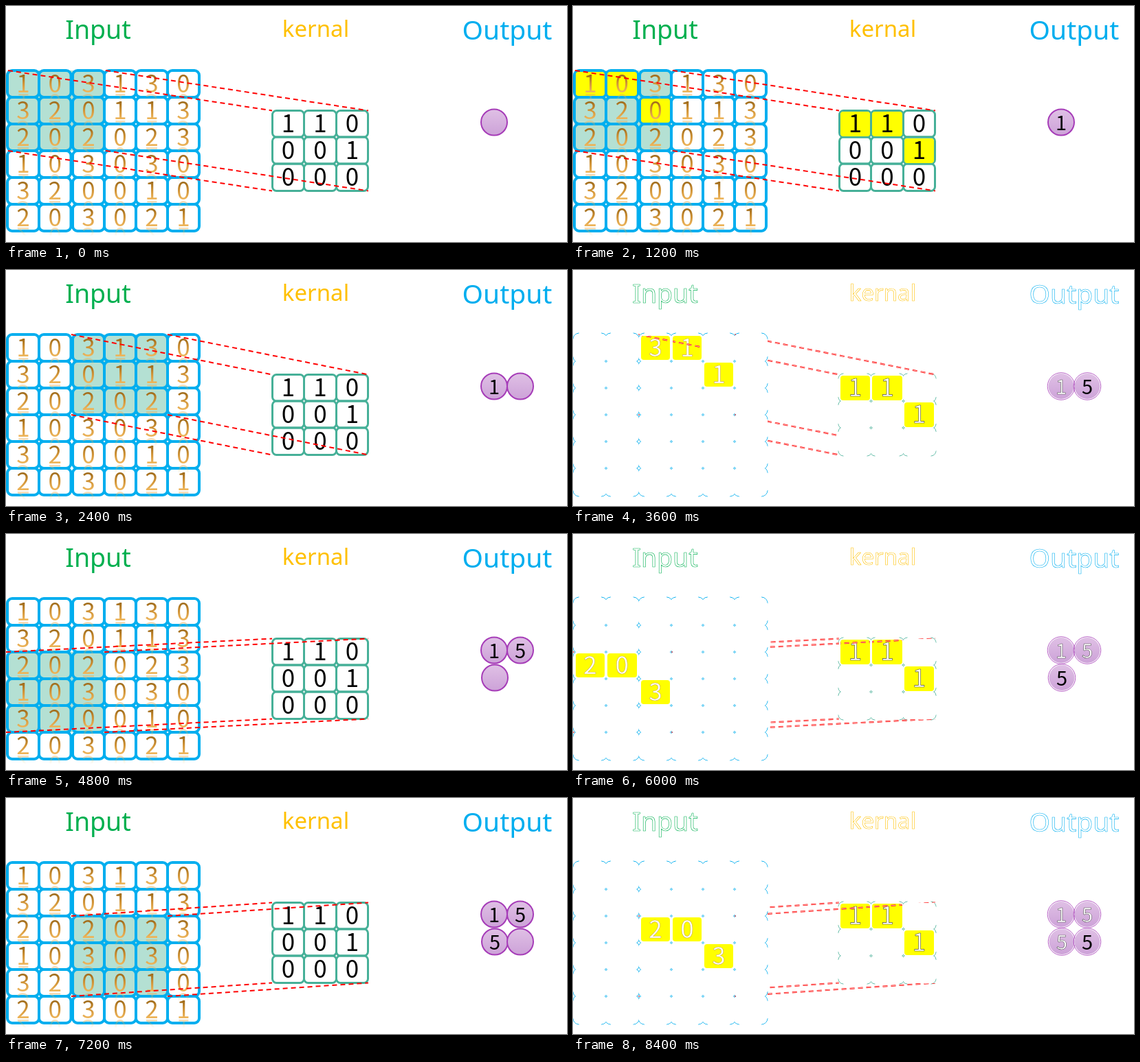
Recreate the animation shown at these times as an HTML page with a canvas. Size 816x344 px, loop 9.6 s.

```html
<!DOCTYPE html>
<html lang="en">
<head>
<meta charset="utf-8">
<title>Convolution with stride 2</title>
<style>
html, body { margin: 0; width: 100%; height: 100%; overflow: hidden; background: #fff; }
canvas { display: block; }
</style>
</head>
<body>
<canvas id="stage" width="816" height="344"></canvas>
<script>
const ctx = document.getElementById('stage').getContext('2d');
const STEP = 1200, STEPS = 8;
const BLUE = '#00aeef', TEAL = '#46b098', RED = '#ff0000', YELLOW = '#ffff00';
const DIGITS = '"Noto Sans CJK TC", "Noto Sans CJK SC", "Noto Sans CJK JP", "Noto Sans CJK", Lato, sans-serif';

const input = {
  values: ['103130', '320113', '202023', '103030', '320010', '203021'],
  cols: [[2, 48], [48, 94.5], [97, 143], [143, 189], [189, 235], [235, 281]],
  rows: [94, 133, 172, 211, 250, 289, 328],
  color: BLUE, width: 4, radius: 7
};
const kernel = {
  values: ['110', '001', '000'],
  cols: [[387.5, 433.5], [433.5, 480.5], [480.5, 526.5]],
  rows: [152.5, 191, 230, 269.5],
  color: TEAL, width: 3, radius: 6
};
const windows = [[0, 0], [0, 2], [2, 0], [2, 2]];
const hits = [[0, 0], [0, 1], [1, 2]];
const sums = ['1', '5', '5', '5'];
const spots = [[710, 169.5], [748, 169.5], [711, 209.5], [748, 209.5]];
const titles = [
  ['Input', 134, 48, 37.5, '#00b050'],
  ['kernal', 450.5, 45, 33, '#ffc000'],
  ['Output', 729, 48.5, 39, '#00aeef']
];

function roundBox(x, y, w, h, r) {
  ctx.beginPath();
  ctx.roundRect(x, y, w, h, r);
}

function eachCell(grid, draw) {
  grid.values.forEach((line, r) => [...line].forEach((digit, c) => {
    const [x, right] = grid.cols[c], y = grid.rows[r];
    draw(x, y, right - x, grid.rows[r + 1] - y, digit, r, c);
  }));
}

function drawText(text, x, y, color, outline) {
  ctx.fillStyle = color;
  ctx.fillText(text, x, y);
  if (!outline) return;
  ctx.strokeStyle = outline;
  ctx.lineWidth = 0.6;
  ctx.lineJoin = 'round';
  ctx.strokeText(text, x, y);
}

function drawTitles(ghost) {
  for (const [text, x, y, size, color] of titles) {
    ctx.font = `${size}px "Noto Sans", "Open Sans", sans-serif`;
    drawText(text, x, y, ghost ? '#fff' : color, ghost && color);
  }
}

function goldDigit(digit, x, base) {
  const gold = ctx.createLinearGradient(0, base - 26, 0, base);
  gold.addColorStop(0, '#9a6718');
  gold.addColorStop(0.5, '#cf9235');
  gold.addColorStop(1, '#eeb65c');
  drawText(digit, x, base, gold);

  const mirror = ctx.createLinearGradient(0, base, 0, base - 13);
  mirror.addColorStop(0, 'rgba(226,170,84,0.5)');
  mirror.addColorStop(1, 'rgba(240,200,130,0)');
  ctx.save();
  ctx.translate(0, 2 * base + 2);
  ctx.scale(1, -1);
  drawText(digit, x, base, mirror);
  ctx.restore();
}

function drawGrid(grid) {
  ctx.strokeStyle = grid.color;
  ctx.lineWidth = grid.width;
  eachCell(grid, (x, y, w, h) => {
    roundBox(x, y, w, h, grid.radius);
    ctx.stroke();
  });
}

// Only the corner arcs not covered by a neighbouring cell remain.
function drawGhostGrid(grid) {
  const out = grid.width / 2, radius = grid.radius + out;
  ctx.strokeStyle = grid.color;
  ctx.lineWidth = 1;
  eachCell(grid, (x, y, w, h) => {
    const x0 = x - out + radius, x1 = x + w + out - radius;
    const y0 = y - out + radius, y1 = y + h + out - radius;
    [[x1, y1], [x0, y1], [x0, y0], [x1, y0]].forEach(([cx, cy], i) => {
      ctx.beginPath();
      ctx.arc(cx, cy, radius, i * Math.PI / 2, (i + 1) * Math.PI / 2);
      ctx.stroke();
    });
  });
  ctx.fillStyle = '#fff';
  eachCell(grid, (x, y, w, h) => {
    const e = out - 0.4;
    roundBox(x - e, y - e, w + 2 * e, h + 2 * e, radius - 0.4);
    ctx.fill();
  });
}

function hitBoxes(grid, row, col) {
  const pad = grid.width / 2;
  return hits.map(([r, c]) => {
    const [x, right] = grid.cols[col + c];
    const x0 = Math.round(x + pad), y0 = Math.round(grid.rows[row + r] + pad);
    const x1 = Math.round(right - pad), y1 = Math.round(grid.rows[row + r + 1] - pad);
    return [x0, y0, x1 - x0, y1 - y0];
  });
}

function highlight(boxes) {
  ctx.fillStyle = YELLOW;
  for (const box of boxes) {
    roundBox(...box, 4);
    ctx.fill();
  }
}

function isHit(r, c, row, col) {
  return hits.some(([hr, hc]) => hr + row === r && hc + col === c);
}

function drawDigits(ghost, row, col) {
  ctx.font = `35px ${DIGITS}`;
  eachCell(input, (x, y, w, h, digit, r, c) => {
    const cx = x + w / 2, base = y + 31.5;
    if (!ghost) goldDigit(digit, cx, base);
    else if (isHit(r, c, row, col)) drawText(digit, cx, base, '#fff', '#c9a860');
  });
  eachCell(kernel, (x, y, w, h, digit, r, c) => {
    const cx = x + w / 2, base = y + 31.5;
    if (!ghost) drawText(digit, cx, base, '#000');
    else if (isHit(r, c, 0, 0)) drawText(digit, cx, base, '#fff', '#444');
  });
}

function beams(row, col) {
  const left = col ? 95 : row ? 0 : 3;
  const right = col ? 235 : row ? 143 : 145;
  const top = input.rows[row], bottom = input.rows[row + 3];
  return [
    [left, top, 387, 152.5], [right, top, 527, 152.5],
    [left, bottom, 387, 269.5], [right, bottom, 527, 269.5]
  ];
}

function strokeBeams(list, color, width) {
  ctx.strokeStyle = color;
  ctx.lineWidth = width;
  ctx.setLineDash([7, 5]);
  for (const [x0, y0, x1, y1] of list) {
    ctx.beginPath();
    ctx.moveTo(x0, y0);
    ctx.lineTo(x1, y1);
    ctx.stroke();
  }
  ctx.setLineDash([]);
}

function drawGhostBeams(list, boxes) {
  ctx.save();
  ctx.beginPath();
  ctx.rect(283, 92, 104, 238);
  ctx.rect(387, 92, 142, 61);
  ctx.rect(387, 270, 142, 20);
  boxes.forEach(box => ctx.rect(...box));
  ctx.clip();
  strokeBeams(list, RED, 2.2);
  strokeBeams(list, '#fff', 0.7);
  ctx.restore();
  ctx.fillStyle = RED;
  for (const [x, y] of list) ctx.fillRect(x, y - 0.5, 2, 1);
}

function disc(x, y, r) {
  ctx.beginPath();
  ctx.arc(x, y, r, 0, 2 * Math.PI);
}

function drawOutput(index, ghost) {
  for (const [x, y] of spots.slice(0, index + 1)) {
    const fill = ctx.createLinearGradient(0, y - 19, 0, y + 19);
    fill.addColorStop(0, '#dfc0e5');
    fill.addColorStop(1, '#cda2d8');
    ctx.fillStyle = fill;
    ctx.strokeStyle = '#a63cb8';
    ctx.lineWidth = ghost ? 0.8 : 2;
    disc(x, y, ghost ? 18.5 : 19);
    ctx.fill();
    if (ghost) disc(x, y, 19.8);
    ctx.stroke();
  }
}

function drawSums(index, computed, ghost) {
  ctx.font = `29px ${DIGITS}`;
  const count = computed ? index + 1 : index;
  for (let i = 0; i < count; i++) {
    const [x, y] = spots[i];
    const hollow = ghost && i < index;
    drawText(sums[i], x, y + 11.5, hollow ? '#fff' : '#000', hollow && '#555');
  }
}

function drawScene(step) {
  const index = step >> 1, computed = step % 2 === 1;
  const ghost = computed && index > 0;
  const [row, col] = windows[index];
  const boxes = computed ? [...hitBoxes(input, row, col), ...hitBoxes(kernel, 0, 0)] : [];
  const lines = beams(row, col);

  ctx.fillStyle = '#fff';
  ctx.fillRect(0, 0, 816, 344);
  ctx.textAlign = 'center';
  ctx.textBaseline = 'alphabetic';
  drawTitles(ghost);

  if (ghost) {
    drawGhostGrid(input);
    drawGhostGrid(kernel);
  } else {
    const x = input.cols[col][0], y = input.rows[row];
    ctx.fillStyle = '#b4e0d3';
    ctx.fillRect(x, y, input.cols[col + 2][1] - x, input.rows[row + 3] - y);
    drawGrid(input);
    drawGrid(kernel);
  }
  highlight(boxes);
  drawDigits(ghost, row, col);
  if (ghost) drawGhostBeams(lines, boxes);
  else strokeBeams(lines, RED, 2);
  drawOutput(index, ghost);
  drawSums(index, computed, ghost);
}

const start = performance.now();
function tick() {
  drawScene(Math.floor((performance.now() - start) / STEP) % STEPS);
  requestAnimationFrame(tick);
}
tick();
</script>
</body>
</html>
```
